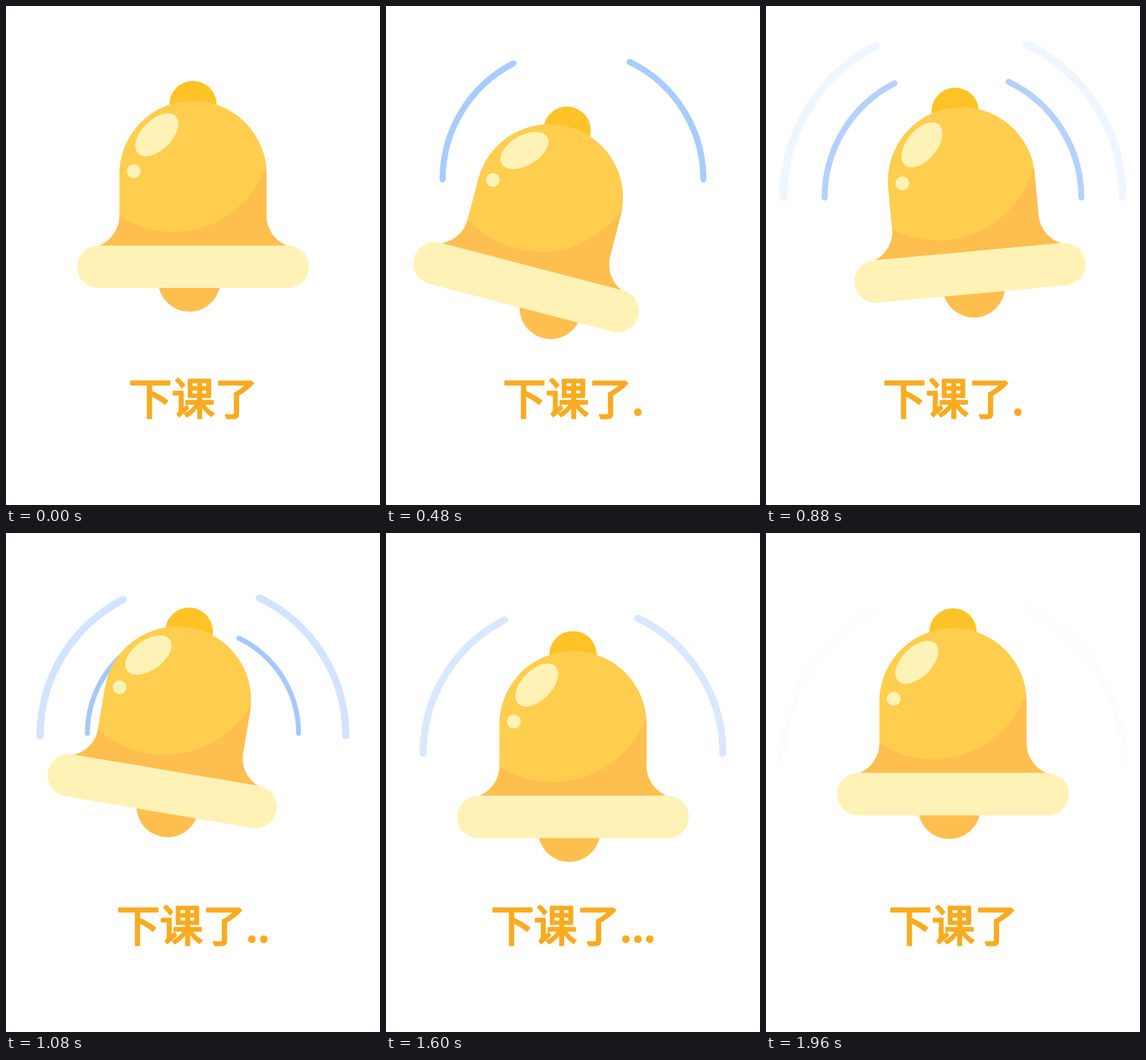
Recreate the animation shown at these times as an HTML page. Size 600 px wide and 800 px high, loop 2000 ms.

```html
<!DOCTYPE html>
<html lang="zh-CN">
<head>
<meta charset="utf-8">
<title>下课了</title>
<style>
  html, body { margin: 0; width: 100%; height: 100%; overflow: hidden; background: #fff; }
  svg { display: block; width: 100vw; height: 100vh; }
  text {
    font: 400 69px "Noto Sans CJK SC", "Noto Sans CJK", sans-serif;
    text-anchor: middle;
    fill: #f9ab20;
    stroke: #f9ab20;
    stroke-width: 3px;
    stroke-linejoin: round;
  }
</style>
</head>
<body>
<svg viewBox="0 0 600 800">
  <defs>
    <clipPath id="body-clip">
      <path id="body" d="M150 384A52 52 0 0 0 182 336V270A118 118 0 0 1 418 270V336A52 52 0 0 0 450 384Z"/>
    </clipPath>
  </defs>
  <g id="waves" fill="none" stroke="#68a5ff" stroke-linecap="round"></g>
  <g id="bell">
    <circle cx="300" cy="158" r="38" fill="#ffc328"/>
    <circle id="clapper" cx="294" cy="440" r="50" fill="#ffbf4f"/>
    <use href="#body" fill="#ffbf4f"/>
    <circle cx="268" cy="203" r="159" fill="#ffce4f" clip-path="url(#body-clip)"/>
    <ellipse rx="42.5" ry="24" transform="translate(242 206.5) rotate(-45)" fill="#fff2b6"/>
    <circle cx="205" cy="265" r="11" fill="#fff2b6"/>
    <rect x="114" y="384" width="372" height="68" rx="34" fill="#fff2b6"/>
  </g>
  <text id="label" x="300.5" y="655"></text>
</svg>
<script>
const LOOP = 2000, STEP = 40, DOT_TIME = 480;
const byId = id => document.getElementById(id);
const bell = byId('bell'), clapper = byId('clapper'), label = byId('label');

// Keys are [time, value]
const drop = [[0, 0], [475, 42.5], [1090, 0], [1510, 40.5], [2000, 0]];
const swing = [[0, 0], [220, -15], [460, 15], [727, -13], [1115, 10], [1330, 0]];
const strike = [[0, 0], [270, -60], [520, 60], [733, -30], [974, 30], [1265, -9.5], [1500, 0]];

// Each ring is fainter than the one before
const waves = [
  { start: 100, end: 970, y: 184, strength: 1 },
  { start: 523, end: 1378, y: 214.5, strength: 0.85 },
  { start: 945, end: 2000, y: 245, strength: 0.68 }
];
for (const wave of waves) {
  wave.path = document.createElementNS('http://www.w3.org/2000/svg', 'path');
  byId('waves').append(wave.path);
}

const ease = u => (1 - Math.cos(Math.PI * u)) / 2;

function valueAt(keys, t) {
  const next = keys.findIndex(key => key[0] > t);
  if (next < 0) return keys[keys.length - 1][1];
  const [t0, v0] = keys[next - 1], [t1, v1] = keys[next];
  return v0 + (v1 - v0) * ease((t - t0) / (t1 - t0));
}

function drawWave({ start, end, y, strength, path }, t) {
  const u = (t - start) / (end - start);
  const visible = u > 0 && u < 1;
  path.setAttribute('visibility', visible ? 'visible' : 'hidden');
  if (!visible) return;
  const r = 165 + 110 * ease(u);
  const base = y + 0.45 * r; // grows around the middle of its height
  path.setAttribute('d',
    `M${300 - r} ${base}A${r} ${r} 0 0 1 ${300 - 0.456 * r} ${base - 0.89 * r}` +
    `M${300 + r} ${base}A${r} ${r} 0 0 0 ${300 + 0.434 * r} ${base - 0.901 * r}`);
  path.setAttribute('stroke-width', 0.047 * r);
  path.setAttribute('opacity', strength * Math.min(1 - u, (t - start) / 120));
}

function draw(t) {
  bell.setAttribute('transform',
    `translate(0 ${valueAt(drop, t)}) rotate(${valueAt(swing, t)} 300 120)`);
  clapper.setAttribute('cx', 294 + valueAt(strike, t));
  waves.forEach(wave => drawWave(wave, t));
  label.textContent = '下课了' + '.'.repeat(Math.floor(t / DOT_TIME) % 4);
}

const origin = performance.now();
function tick() {
  const t = (performance.now() - origin) % LOOP;
  draw(Math.floor(t / STEP) * STEP);
  requestAnimationFrame(tick);
}
tick();
</script>
</body>
</html>
```
